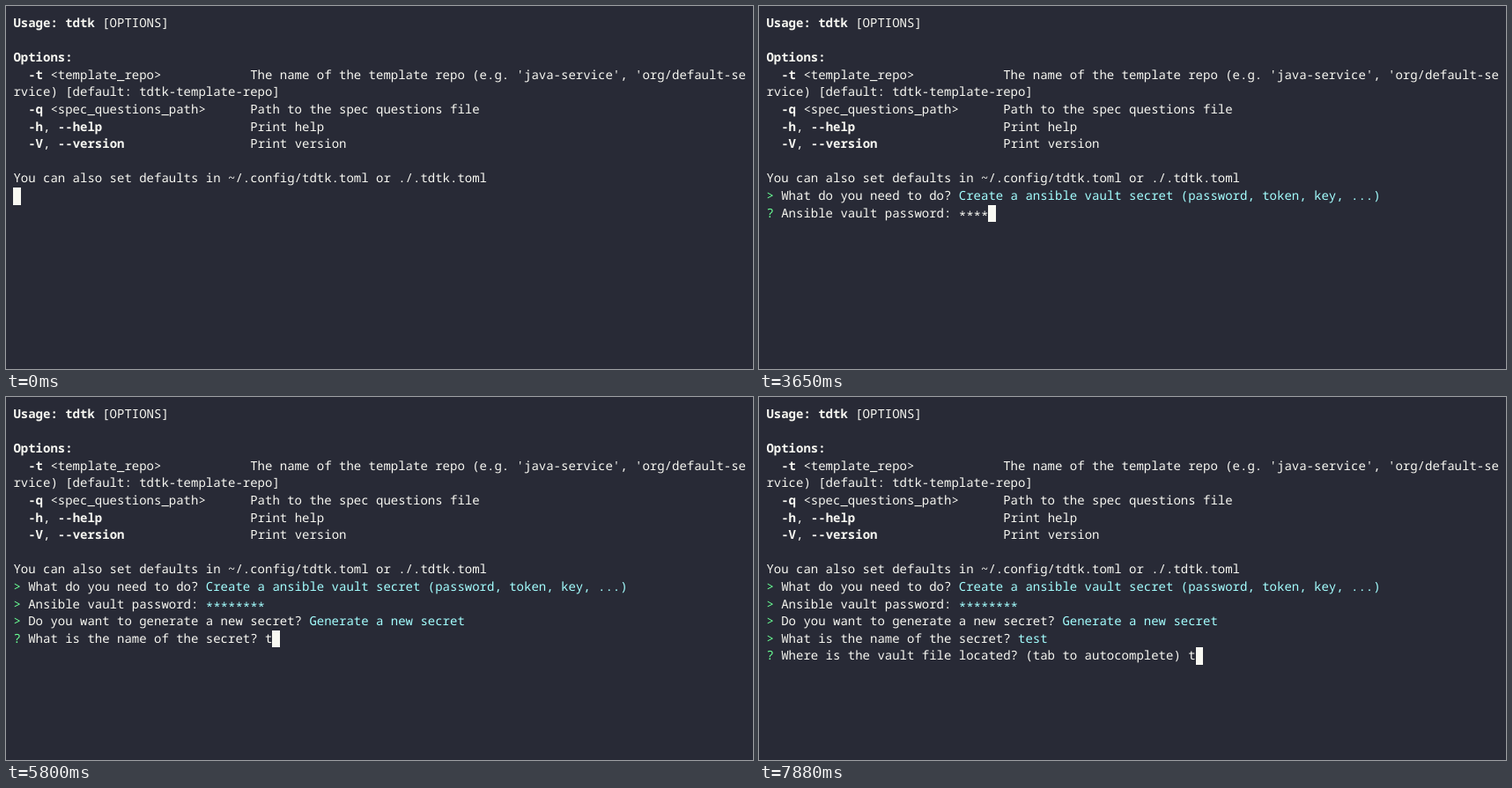
Write an HTML page that moves like this. It is 848 by 412 pixels and loops after 8000 ms.

```html
<!DOCTYPE html>
<html lang="en">
<head>
<meta charset="utf-8">
<title>Terminal session</title>
<style>
  html, body { margin: 0; width: 100%; height: 100%; overflow: hidden; background: #282a36; }
  svg { display: block; width: 848px; height: 412px; }
  text {
    font: 14px "Noto Sans Mono", "DejaVu Sans Mono", monospace;
    font-variant-ligatures: none;
    text-rendering: geometricPrecision;
    white-space: pre;
    fill: #f8f8f2;
  }
  .b { font-weight: 700; }
  .g { fill: #69ff94; }
  .c { fill: #a4ffff; }
  #cursor { fill: #f8f8f2; }
</style>
</head>
<body>
<svg viewBox="0 0 848 412">
  <rect width="848" height="412" fill="#282a36"/>
  <g id="usage"></g>
  <g id="session"></g>
  <rect id="cursor"/>
</svg>
<script>
const NS = "http://www.w3.org/2000/svg";
const LOOP = 8000, LEFT = 8.4, TOP = 10, COL = 8.4, ROW = 19.6, ASCENT = 14;
const FIRST = 10; // first row of the interactive part
const byId = id => document.getElementById(id);

// {b:bold} {g:green} {c:cyan} {w:plain}
const usage = [
  "{b:Usage:} {b:tdtk} [OPTIONS]",
  "",
  "{b:Options:}",
  "  {b:-t} <template_repo>            The name of the template repo (e.g. 'java-service', 'org/default-se",
  "rvice) [default: tdtk-template-repo]",
  "  {b:-q} <spec_questions_path>      Path to the spec questions file",
  "  {b:-h}, {b:--help}                    Print help",
  "  {b:-V}, {b:--version}                 Print version",
  "",
  "You can also set defaults in ~/.config/tdtk.toml or ./.tdtk.toml"
];

const ask = (question, typed = "") => `{g:?} ${question} {w:${typed}}`;
const done = (question, answer) => `{g:>} ${question} {c:${answer}}`;
const menu = (picked, other) => [
  `{c:>} ${picked}`,
  `  ${other}`,
  "{c:[↑↓ to move, enter to select, type to filter]}"
];

const task = "What do you need to do?";
const vault = "Ansible vault password:";
const generate = "Do you want to generate a new secret?";
const name = "What is the name of the secret?";
const place = "Where is the vault file located? (tab to autocomplete)";

const create = "Create a ansible vault secret (password, token, key, ...)";
const fresh = "Generate a new secret";

const afterTask = [done(task, create)];
const afterVault = [...afterTask, done(vault, "********")];
const afterGenerate = [...afterVault, done(generate, fresh)];
const afterName = [...afterGenerate, done(name, "test")];

// One step per key press: the prompt with 0, 1, 2 ... characters typed
const typing = (before, question, word, times) =>
  times.map((at, n) => ({ at, before, prompt: ask(question, word.slice(0, n)) }));

const steps = [
  { at: 0, before: [], prompt: "" },
  { at: 1020, before: [], prompt: ask(task), after: menu(create, "Create a new service") },
  ...typing(afterTask, vault, "****", [2330, 3150, 3320, 3590, 3650]),
  { at: 3940, before: afterVault, prompt: ask(generate), after: menu(fresh, "Use an existing secret") },
  ...typing(afterGenerate, name, "test", [4910, 5800, 5950, 6250, 6320]),
  ...typing(afterName, place, "t", [6920, 7880])
];

function textLine(source, row) {
  const line = document.createElementNS(NS, "text");
  line.setAttribute("x", LEFT);
  line.setAttribute("y", Math.round(TOP + row * ROW + ASCENT));
  for (const [, style, styled, plain] of source.matchAll(/\{(\w):(.*?)\}|([^{]+)/g)) {
    const run = document.createElementNS(NS, "tspan");
    run.textContent = plain ?? styled;
    if (style) run.setAttribute("class", style);
    // terminal asterisks sit at mid height
    if (/^\*+$/.test(run.textContent)) run.setAttribute("dy", 3);
    line.append(run);
  }
  return line;
}

function drawLines(group, lines, firstRow) {
  group.replaceChildren(...lines.map((line, i) => textLine(line, firstRow + i)));
}

function placeCursor(col, row) {
  const x = Math.round(LEFT + col * COL), right = Math.round(LEFT + (col + 1) * COL);
  const y = Math.round(TOP + row * ROW), bottom = Math.round(TOP + (row + 1) * ROW);
  const box = { x, y, width: right - x, height: bottom - y };
  for (const key in box) byId("cursor").setAttribute(key, box[key]);
}

function show({ before, prompt, after = [] }) {
  drawLines(byId("session"), [...before, prompt, ...after], FIRST);
  const visible = prompt.replace(/\{\w:(.*?)\}/g, "$1");
  placeCursor(visible.length, FIRST + before.length);
}

let shown;
function tick() {
  const t = performance.now() % LOOP;
  const step = steps.findLast(s => s.at <= t);
  if (step !== shown) show(shown = step);
  requestAnimationFrame(tick);
}

drawLines(byId("usage"), usage, 0);
tick();
</script>
</body>
</html>
```
